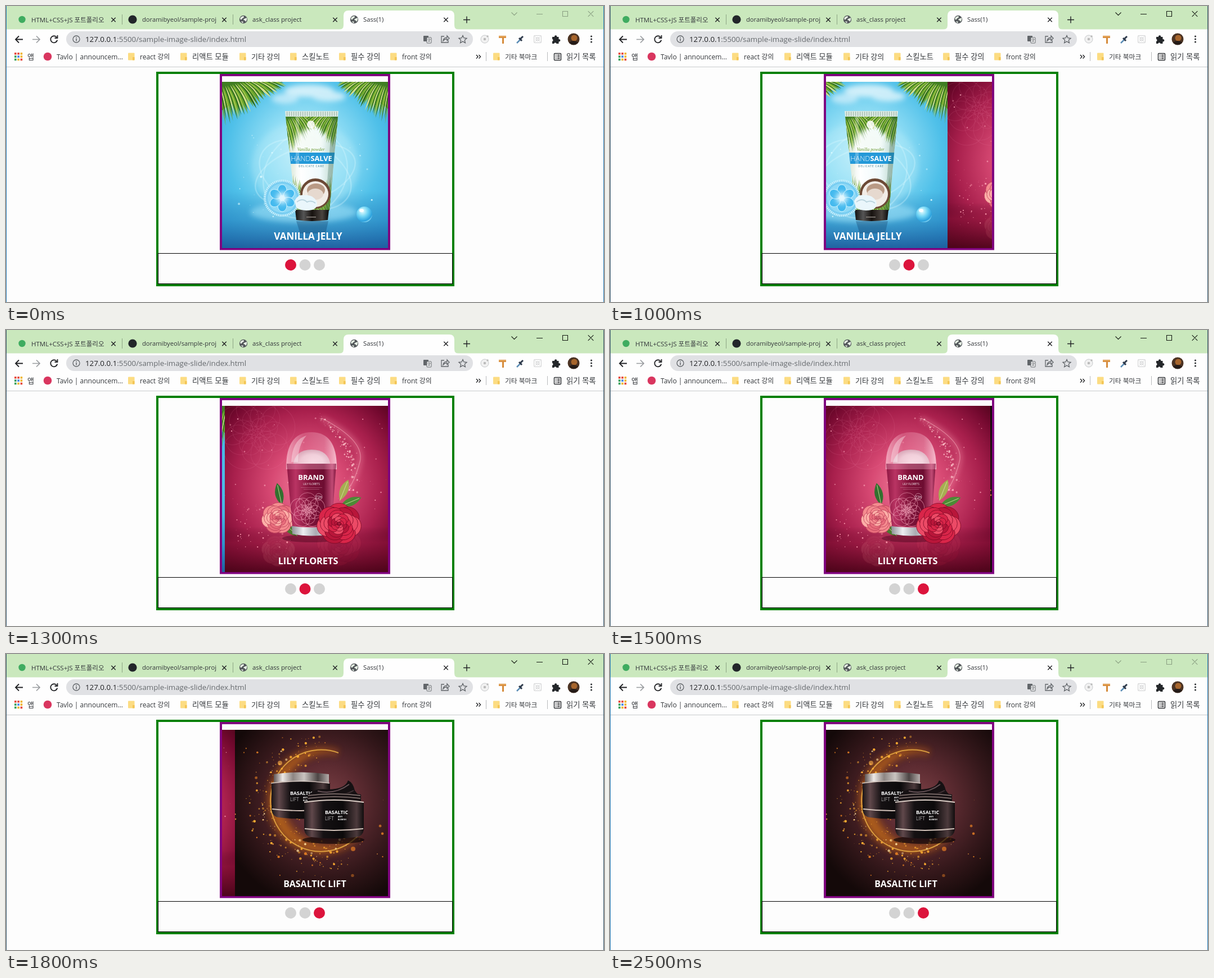
Recreate the animation shown at these times as an HTML page. Size 1063 by 527 pixels, loop 2600 ms.

```html
<!DOCTYPE html>
<html lang="ko">
<head>
<meta charset="utf-8">
<title>Image slide</title>
<style>
html, body { margin: 0; width: 100%; height: 100%; overflow: hidden; background: #fdfdfd; }
svg { display: block; }
text { font-family: "Open Sans", "Noto Sans CJK KR", "Noto Sans CJK", sans-serif; fill: #33363a; white-space: pre; }
.label { font-family: "Open Sans", "Noto Sans", sans-serif; fill: #fff; text-anchor: middle; }
.line { fill: none; stroke: #202124; stroke-width: 1.4; }
</style>
</head>
<body>
<svg id="stage" width="1063" height="527" viewBox="0 0 1063 527"></svg>
<script>
const LOOP = 2600, STEP = 100, SLIDE_W = 295;
const SLIDE_TIME = 470, SLIDE_STARTS = [912, 1490], DOT_TIMES = [1000, 1500];

// ---- drawing helpers ----
const rect = (x, y, w, h, fill, more = '') => `<rect x="${x}" y="${y}" width="${w}" height="${h}" fill="${fill}" ${more}/>`;
const circle = (x, y, r, fill, more = '') => `<circle cx="${x}" cy="${y}" r="${r}" fill="${fill}" ${more}/>`;
const oval = (x, y, rx, ry, fill, more = '') => `<ellipse cx="${x}" cy="${y}" rx="${rx}" ry="${ry}" fill="${fill}" ${more}/>`;
const path = (d, fill, more = '') => `<path d="${d}" fill="${fill}" ${more}/>`;
const line = (d, more = '') => `<path class="line" d="${d}" ${more}/>`;
const curve = (d, color, width, more = '') => path(d, 'none', `stroke="${color}" stroke-width="${width}" ${more}`);
const text = (x, y, size, s, more = '') => `<text x="${x}" y="${y}" font-size="${size}" ${more}>${s}</text>`;
const label = (x, y, size, s, weight = 700, more = '') => text(x, y, size, s, `class="label" font-weight="${weight}" ${more}`);
const group = (x, y, body, turn = '', more = '') => `<g transform="translate(${x} ${y}) ${turn}" ${more}>${body}</g>`;
const repeat = (n, fn) => Array.from({ length: n }, (_, i) => fn(i)).join('');
const random = seed => () => (seed = seed * 16807 % 2147483647) / 2147483647;
const SOFT = 'filter="url(#soft)"';

// stops: "color offset opacity" separated by commas
const gradient = (kind, id, attrs, stops) => `<${kind}Gradient id="${id}" ${attrs}>` + stops.split(',').map(s => {
  const [color, offset, alpha = 1] = s.trim().split(' ');
  return `<stop stop-color="${color}" offset="${offset}" stop-opacity="${alpha}"/>`;
}).join('') + `</${kind}Gradient>`;
const linear = (id, stops, attrs = '') => gradient('linear', id, attrs, stops);
const radial = (id, stops, attrs = '') => gradient('radial', id, attrs, stops);
const down = 'x1="0" y1="0" x2="0" y2="1"';

const defs = `<defs>
${linear('fade1', '#33363a 0,#33363a 0 1', 'gradientUnits="userSpaceOnUse" x1="160" y1="0" x2="180" y2="0"')}
${linear('fade2', '#33363a 0,#33363a 0 1', 'gradientUnits="userSpaceOnUse" x1="356" y1="0" x2="378" y2="0"')}
${radial('sky', '#d8f4fb 0,#8edcf4 .32,#4fc0e9 .62,#2a9bd6 1', 'cx=".5" cy=".42" r=".75"')}
${linear('deep', '#1c5a9c 0 0,#1f6cab .5 .35,#1b5596 1 .85', down)}
${linear('tube', '#c9dcc5 0,#fff .3,#eef9fb .65,#a5c8b6 1')}
${linear('cap', '#111 0,#555 .25,#17120f .5,#4a4440 .8,#0c0c0c 1')}
${radial('bubble', '#eaffff 0,#72d5f5 .45,#2a9fdc .85,#a8ecff 1', 'cx=".38" cy=".3" r=".75"')}
${radial('pink', '#f07f9c 0,#d84a74 .3,#a9204d .62,#74092f .85,#4c0419 1', 'cx=".5" cy=".48" r=".72"')}
${linear('wine', '#50051e 0 0,#8a1338 .35 .5,#4b0419 1 .85', down)}
${linear('glass', '#f9c3d2 0 .75,#e88aa6 .35 .35,#f4b2c6 .75 .4,#ffdbe5 1 .8')}
${linear('body', '#8d1742 0,#b93463 .18,#801239 .45,#6d0d31 .75,#c14b75 .92,#7a1239 1')}
${linear('steel', '#8f8f96 0,#eceef1 .28,#a9abb2 .6,#d9dce1 .85,#8a8b92 1')}
${radial('ball', '#fff 0,#f3edf0 .6,#cfb6c1 1')}
${radial('ember', '#7d4247 0,#5c2b31 .34,#33171a .7,#140909 1', 'cx=".54" cy=".43" r=".64"')}
${linear('jar', '#1a1517 0,#60484b .13,#151113 .32,#0c0a0b .65,#4c3a3c .88,#110d0e 1')}
${linear('lid', '#5f5553 0,#eee9e6 .16,#8d8583 .35,#c9c3c0 .55,#4c4544 .8,#b5adab 1')}
<clipPath id="window"><rect x="384" y="135" width="295" height="296"/></clipPath>
<clipPath id="frame"><rect width="${SLIDE_W}" height="296"/></clipPath>
<clipPath id="tubeShape"><path d="M113 61H206L191 229H131Z"/></clipPath>
<filter id="soft" x="-50%" y="-50%" width="200%" height="200%"><feGaussianBlur stdDeviation="5"/></filter>
</defs>`;

// ---- browser ----
const cross = (x, y, r) => `M${x - r} ${y - r}l${2 * r} ${2 * r}m0 ${-2 * r}l${-2 * r} ${2 * r}`;
const folder = x => rect(x - 6, 83.5, 11.5, 13, '#fcdc82', 'rx="1"') + path(`M${x + 2} 91h3.5v5.500h-3.5z`, '#f3c554');
const globe = x => circle(x, 24, 7.2, '#53575b') +
  path(`M${x - 5.5} 21q4-4 6.5-2.500q0 3-3 3.500q-1 3-3.500 2zM${x + 1} 23l5-2q1 4-2 7q-1-3-4-3z`, '#e8f2e6') +
  path(`M${x - 4} 27l4 1l-1 2.500q-2-1-3-3.500z`, '#e8f2e6');
const dividers = (xs, y, h, color) => xs.map(x => rect(x, y, 1, h, color)).join('');

function tabs() {
  return rect(0, 0, 1063, 42, '#cae8bd') +
    path('M592 42q8 0 8-8V17q0-9 9-9H788q9 0 9 9V34q0 8 8 8z', '#fefefe') +
    dividers([206, 403], 15, 18, '#8da584') +
    circle(28.5, 24, 6.2, '#3fac60') + circle(225, 24, 7.6, '#22262a') + globe(422) + globe(619) +
    text(45, 28.5, 11.5, 'HTML+CSS+JS 포트폴리오', 'style="fill:url(#fade1)"') +
    text(242, 28, 11.2, 'doramibyeol/sample-proj', 'style="fill:url(#fade2)"') +
    text(438, 28, 11.3, 'ask_class project') + text(635, 28, 11.3, 'Sass(1)') +
    [191, 388, 585, 782].map(x => line(cross(x, 24.5, 3.7))).join('') +
    line('M813 24.500h12m-6-6v12') +
    `<path id="controls" fill="none" stroke-width="1.1" d="M898.500 11.500l5 5 5-5M943 14.500h11M989.500 9.500h9v9h-9z${cross(1039.5, 14, 4.8)}"/>`;
}

function toolbar() {
  const grey = 'style="stroke:#606468;stroke-width:1.3"';
  return rect(0, 41.5, 1063, 67, '#fefefe') + rect(0, 108, 1063, 1, '#c8cacc') +
    rect(107, 45, 723, 28, '#e0e1e4', 'rx="14"') +
    line('M30 59.500H17m6-6l-6 6 6 6', 'style="stroke-width:1.8"') +
    line('M47 59.500h13m-6-6l6 6-6 6', 'style="stroke:#999c9f;stroke-width:1.7"') +
    line('M90 55.500a6 6 0 1 0 1.200 5M91.500 52v5h-5', 'style="stroke-width:1.8"') +
    circle(125, 59, 6, 'none', grey) + rect(124.3, 58, 1.5, 4.5, '#606468') + rect(124.3, 55.5, 1.5, 1.5, '#606468') +
    text(141, 64, 13.3, '127.0.0.1<tspan fill="#666a6e">:5500/sample-image-slide/index.html</tspan>', 'style="fill:#202124"') +
    // address bar icons
    rect(742, 53, 9, 10, '#62666a', 'rx="1"') + rect(748, 56, 8, 10, '#f2f3f4', 'rx="1" stroke="#62666a"') +
    line('M749.500 59h5m-2.500-1.500v1.500m2 0q-1 4-4 5m0-3.500l4 3.500', 'style="stroke:#62666a;stroke-width:.9"') +
    line('M779 54h-5v11h12v-4M777 62q1-6 7-6v-3l4 4.500-4 4v-3q-4 0-7 3.500z', grey) +
    line('M812 52.500l2 4.500 5 .5-3.700 3.300 1.100 4.900-4.400-2.600-4.400 2.600 1.100-4.900L805 57.500l5-.5z', grey) +
    // extensions
    circle(851, 59, 7, '#f1f1f1', 'stroke="#c6c8ca"') + circle(851, 59, 2.3, '#bbb') + circle(856, 54, 1.8, '#bbb') +
    path('M876 53h13v4h-4v10h-3V57h-6z', '#d58a3a') + rect(876, 54, 13, 1, '#f1bd76') +
    line('M908 66l6-6', 'style="stroke:#5b8db5;stroke-width:2.5"') + line('M912 57l5 5M915 58l4-4', 'style="stroke:#2f3b4c;stroke-width:3"') +
    rect(938.5, 52.5, 13, 13, '#fafafa', 'stroke="#d2d3d4" rx="1"') + circle(945, 59, 3, 'none', 'stroke="#d2d3d4"') + line('M939 53l12 12m0-12l-12 12', 'style="stroke:#dddedf;stroke-width:1"') +
    path('M971 55h4a2.200 2.200 0 1 1 4.200 0h3.300v4.200a2.200 2.200 0 1 1 0 4.200V67h-4a2.200 2.200 0 0 0-4.300 0H971v-4a2.200 2.200 0 0 0 0-4.200z', '#24272a') +
    circle(1009, 59, 10.5, '#4b3323') + circle(1010, 57, 5.5, '#a7652c') + path('M1001 65q8-6 16 0q-8 8-16 0z', '#241b18') +
    repeat(3, i => circle(1040.5, 54 + 5 * i, 1.6, '#303336'));
}

function bookmarks() {
  const dots = ['#e6483b', '#e6483b', '#f0b429', '#38a05b', '#4384ec', '#f0b429', '#38a05b', '#f0b429', '#e6483b'];
  const items = [[223, 'react 강의', 12], [316, '리액트 모듈', 13.3], [421, '기타 강의', 13], [511, '스킬노트', 13.3], [598, '필수 강의', 13.3], [689, 'front 강의', 12], [872, '기타 북마크', 11.8]];
  return dots.map((c, i) => rect(15 + i % 3 * 5.3, 83 + Math.floor(i / 3) * 5.3, 3.6, 3.6, c)).join('') +
    text(38, 94.5, 13, '앱') + circle(74, 90, 7.3, '#d9365f') + text(90, 94.5, 12, 'Tavlo | announcem…') +
    items.map(([x, s, size]) => folder(x) + text(x + 15, 94.5, size, s)).join('') +
    line('M836 87l3 3.300-3 3.300m4.500-6.600l3 3.300-3 3.300') + dividers([853, 962], 82, 16, '#b9bbbd') +
    rect(974.5, 84.5, 12, 12, 'none', 'rx="1" stroke="#303336" stroke-width="1.5"') +
    line('M977 87.500h1.500m1.500 0h4.500M977 90.500h1.500m1.500 0h4.500M977 93.500h1.500m1.500 0h4.500') +
    text(996, 94.5, 13.3, '읽기 목록');
}

// ---- slide pictures ----
function sparks(n, seed, color, place, size = 1.2) {
  const rnd = random(seed);
  return repeat(n, () => {
    const [x, y] = place(rnd);
    return circle(x.toFixed(1), y.toFixed(1), (size * (.3 + rnd() ** 2)).toFixed(2), color, `opacity="${(.4 + rnd() * .6).toFixed(2)}"`);
  });
}

// needles fan out of a corner, their tips on a diagonal arc
function palm(n, seed) {
  const rnd = random(seed), greens = ['#2c6b1d', '#6aa52c', '#a3c748', '#417f22', '#d3df8a'];
  return path('M-5-5H88Q44 20-5 54z', '#3f7d22') + repeat(n, i => {
    const u = i / (n - 1), v = 1 - u, reach = .82 + rnd() * .24;
    const x = 72 - 80 * u, y = -8 + 18 * u;
    const dx = (118 * v * v + 132 * u * v + 4 * u * u - x) * reach;
    const dy = (4 * v * v + 88 * u * v + 80 * u * u - y) * reach;
    const at = (a, b) => `${(x + dx * a).toFixed(1)} ${(y + dy * b).toFixed(1)}`;
    return path(`M${at(0, 0)}Q${at(.68, .36)} ${at(1, 1)}Q${at(.5, .52)} ${at(0, 0)}`, greens[i % 5]);
  });
}

function blueSlide() {
  const leaf = palm(48, 17);
  const swirl = (rx, ry, turn) => oval(148, 165, rx, ry, 'none', `stroke="#e3fbff" stroke-opacity=".28" stroke-width="2.5" transform="rotate(${turn} 148 165)"`);
  const tube = rect(110, 58, 100, 175, 'url(#tube)') +
    group(108, 60, leaf, 'scale(.66 .95)') + group(212, 60, leaf, 'scale(-.58 .85)') +
    group(124, 234, leaf, 'scale(.5 -.9)') + group(198, 234, leaf, 'scale(-.42 -.9)') +
    oval(156, 106, 26, 22, '#f4fbf6', `opacity=".8" ${SOFT}`) + rect(110, 126, 100, 20, '#2499d8') +
    rect(131, 60, 6, 170, '#fff', 'opacity=".25"') + path('M196 60h10l-15 170h-8z', '#1d4c38', 'opacity=".25"');
  const petals = repeat(6, i => oval(107, 193, 8, 10, '#43b9ee', `stroke="#c6f1ff" transform="rotate(${i * 60} 107 207)"`));
  const haze = oval(155, 16, 44, 11, '#e9f8fd') + oval(190, 26, 30, 9, '#e3f6fc') + oval(112, 30, 24, 9, '#cdeefa') +
    oval(148, 150, 95, 80, '#b4ebfa', 'opacity=".5"') + oval(145, 232, 95, 18, '#a4e6fb', 'opacity=".7"');
  return rect(0, 0, SLIDE_W, 296, 'url(#sky)') + rect(0, 195, SLIDE_W, 101, 'url(#deep)') +
    group(0, 0, haze, '', `${SOFT} opacity=".8"`) +
    swirl(92, 48, -18) + swirl(86, 56, 25) + swirl(70, 82, 38) +
    sparks(48, 29, '#d9faff', r => [30 + r() * 240, 95 + r() * 150], 1.7) +
    group(0, 0, leaf) + group(295, 0, leaf, 'scale(-.8 .95)') +
    path('M132 248h57l-5 22h-45z', '#123f6b', 'opacity=".35"') +
    `<g clip-path="url(#tubeShape)">${tube}</g>` +
    path('M112 52h95l-1 10h-93z', '#dbe9e2') + repeat(23, i => rect(115 + i * 4, 53, 1.2, 8, '#9fb8ab')) +
    circle(158, 76, 7, '#fff', 'opacity=".85"') +
    text(158, 123, 8, 'Vanilla powder', 'text-anchor="middle" font-style="italic" style="fill:#6d9a34;font-family:\'Liberation Serif\',serif"') +
    label(159, 141, 12.8, '<tspan font-weight="300">HAND</tspan>SALVE') + label(159, 151.5, 4.5, 'DELICATE CARE', 600, 'style="fill:#5b8e9c" letter-spacing="1"') +
    path('M130 228h60l-2 18q-29 4-56 0z', 'url(#cap)') + rect(150, 240, 17, 1.5, '#8b8580') +
    circle(107, 207, 31, '#78cdf1', 'stroke="#c9f0fc" stroke-width="4" stroke-dasharray="2 1.2"') + circle(107, 207, 26, '#8fd9f6') + petals + circle(107, 207, 10, '#eafaff', SOFT) +
    circle(166, 199, 27, '#6c4935') + circle(166, 200, 23, '#f2ece6') + oval(167, 193, 16, 12, '#b99a85') + oval(166, 200, 14, 10, '#e6d9cf') +
    path('M129 212q6-13 18-10q13-2 21 10q4 12-8 16q-18 3-28-4z', '#eaf6fb') + curve('M133 214q10-8 18 0q8-4 15 2', '#bcd5df', 2) +
    circle(253, 236, 14, 'url(#bubble)') + oval(248, 229, 4, 3, '#fff', 'opacity=".9"') +
    label(153, 281, 17, 'VANILLA JELLY');
}

function flower(x, y, r, colors) {
  return group(x, y, repeat(6, k => {
    const size = r * (1 - k * .16), n = 7 - k % 3;
    return repeat(n, i => oval(0, (-size * .55).toFixed(1), (size * .48).toFixed(1), (size * .42).toFixed(1), colors[(k + i) % 3], `stroke="${colors[3]}" stroke-width=".8" transform="rotate(${i * 360 / n + k * 29})"`));
  }) + curve('M-4 0q4-7 8 0q-4 6-8 0', colors[3], 1.5), 'scale(1 .92)');
}

function sketch(x, y, r, color, alpha) {
  return group(x, y, repeat(4, k => repeat(5, i => oval(0, -r * (.55 - k * .12), r * (.46 - k * .1), r * (.4 - k * .08), 'none', `stroke="${color}" stroke-opacity="${alpha}" transform="rotate(${i * 72 + k * 31})"`))));
}

function redSlide() {
  const blade = (x, y, turn, color) => group(x, y, path('M0 20Q-15 0 0-20Q14 0 0 20', color) + curve('M0 20V-16', '#d5e3a0', .8), `rotate(${turn})`);
  const reds = ['#d92549', '#b9163a', '#ec4a66', '#7d0a26'], pinks = ['#f58b8f', '#e96d7c', '#ffb0a8', '#b83d57'];
  const blooms = flower(95, 200, 31, pinks) + flower(203, 210, 41, reds);
  const trail = 'M172 22Q250 62 240 100T216 152';
  const arc = r => {
    const u = r(), w = (r() + r() - 1) * 16;
    return [172 + 148 * u * (1 - u) + 50 * u * u + w, 22 + 130 * u + w * .4];
  };
  return rect(0, 0, SLIDE_W, 296, 'url(#pink)') + sketch(55, 48, 75, '#f28aa8', .14) + rect(0, 215, SLIDE_W, 81, 'url(#wine)') +
    curve(trail, '#ff9db4', 8, `opacity=".35" ${SOFT}`) + curve(trail, '#ffc0c9', 1.2, 'opacity=".5"') +
    sparks(110, 41, '#ffc4ca', arc, 1.5) + sparks(70, 73, '#ff9db0', r => [20 + r() * 100, 170 + r() * 85], 1.3) +
    sparks(55, 97, '#ffa9bb', r => [r() * 295, r() * 210]) +
    group(0, 458, blooms, 'scale(1 -1)', 'opacity=".12"') +
    blade(97, 157, -12, '#33702f') + blade(115, 218, -45, '#4a7a2e') + blade(212, 150, 22, '#a7ae52') + blade(224, 171, 67, '#4c8b36') +
    oval(154, 236, 52, 7, '#4d061e', 'opacity=".45"') +
    flower(95, 200, 31, pinks) +
    path('M121 122V107Q124 78 154 78Q185 78 188 107V122Z', 'url(#ball)') +
    path('M109 113Q108 47 154 47Q200 47 199 113Z', 'url(#glass)') + path('M118 100Q120 60 145 53Q130 70 130 100z', '#fff', 'opacity=".35"') +
    path('M110 103H198L190 215H120Z', 'url(#body)') + path('M110 103h88l-1 10h-86z', '#e69ab4', 'opacity=".4"') +
    sketch(147, 186, 33, '#f7aabf', .55) +
    path('M119 214Q154 219 191 214L190 228Q154 235 120 228Z', 'url(#steel)') +
    label(153.5, 132, 13, 'BRAND') + label(154, 141, 4.8, 'LILY FLORETS', 400) +
    rect(135, 145, 38, .6, '#e5a4b9', 'opacity=".6"') + rect(140, 148, 28, .6, '#e5a4b9', 'opacity=".6"') +
    circle(167, 162, 6, 'none', 'stroke="#f2c2d0" stroke-width=".6"') + label(167, 165, 6.5, '72h', 400) +
    flower(203, 210, 41, reds) + label(148, 282, 16.3, 'LILY FLORETS');
}

function jar(x, y, w, h, left) {
  const print = (dx, dy, size, s, weight) => label(left + dx, dy, size, s, weight, 'style="text-anchor:start"');
  return group(x, y, path(`M0 4Q${w / 2}-3 ${w} 4V${h - 13}Q${w - 2} ${h - 1} ${w - 13} ${h}Q${w / 2} ${h + 5} 13 ${h}Q2 ${h - 1} 0 ${h - 13}Z`, 'url(#jar)') +
    curve(`M1 ${h - 15}Q${w / 2} ${h - 9} ${w - 1} ${h - 15}`, '#d5c5bc', 1.8) +
    print(0, 25, 8.8, 'BASALTIC', 700) + print(0, 35.5, 8.8, 'LIFT', 300) +
    print(23, 31, 3.4, 'ANTI', 700) + print(23, 35.5, 3.4, 'BLEMISH', 700));
}

function darkSlide() {
  const ring = (spread, from, to) => r => {
    const a = from + (to - from) * r(), d = 90 + (r() + r() - .9) * spread;
    return [152 + Math.cos(a) * d, 126 + Math.sin(a) * d];
  };
  const crescent = 'M184 41A91 91 0 1 0 218 190A84 84 0 1 1 184 41Z';
  return rect(0, 0, SLIDE_W, 296, 'url(#ember)') +
    path(crescent, '#e8841a', `${SOFT} opacity=".65" stroke="#b0560f" stroke-width="16" stroke-opacity=".5"`) +
    curve('M184 41A90 90 0 0 0 64 114A90 90 0 0 0 218 189', '#ffc34c', 2, 'opacity=".7"') +
    sparks(190, 61, '#ffae32', ring(46, 1, 4.7), 1.8) + sparks(60, 87, '#ff8e25', ring(90, .4, 4.9), 2.1) + sparks(35, 53, '#ffe0a0', ring(24, .8, 4.2), 1.9) +
    sparks(22, 111, '#e79540', r => [r() * 285, 15 + r() * 225]) +
    circle(80, 59, 4, '#ffb04a', 'opacity=".6"') + circle(210, 212, 4, '#ff8c25', 'opacity=".6"') +
    oval(175, 196, 55, 7, '#080405', 'opacity=".65"') +
    jar(65, 91, 104, 65, 33) + path('M69 79Q118 72 167 79V94Q118 88 69 94Z', 'url(#lid)') + curve('M64 95Q118 88 168 95', '#d8ccc5', 1.5) +
    path('M132 116Q139 103 165 106Q196 106 201 90Q210 94 213 108L222 119Q178 126 132 116Z', '#161113') +
    curve('M147 109Q178 116 203 97', '#655256', 2) + curve('M157 115Q194 118 211 108', '#433437', 1.5) +
    path('M129 115Q177 108 224 115V128H129Z', '#191315') + curve('M130 117Q177 111 223 117M130 122Q177 116 223 122', '#8b7b77', 1.3) +
    jar(123, 125, 106, 66, 37) + curve('M123 129Q177 121 229 129', '#ddd0c8', 1.8) +
    label(142, 280, 16, 'BASALTIC LIFT');
}

// ---- scene ----
const slides = [blueSlide, redSlide, darkSlide];
document.getElementById('stage').innerHTML = defs + rect(0, 0, 1063, 527, '#fdfdfd') + tabs() + toolbar() + bookmarks() +
  rect(269, 119, 526, 378, '#fdfdfd', 'stroke="#008000" stroke-width="4"') +
  rect(270.5, 440.5, 523, 54, '#fdfdfd', 'stroke="#000"') +
  rect(382, 123, 299, 309.5, '#fdfdfd', 'stroke="#800080" stroke-width="4"') +
  `<g clip-path="url(#window)"><g id="track">${slides.map((draw, i) => group(384 + i * SLIDE_W, 135, draw(), '', 'clip-path="url(#frame)"')).join('')}</g></g>` +
  repeat(3, i => circle(506 + 25.5 * i, 461, 10, '#d3d3d3', 'class="dot"')) +
  `<path id="edge" d="M.5 0V527M1062.500 0V527"/>`;

const track = document.getElementById('track'), edge = document.getElementById('edge');
const controls = document.getElementById('controls'), dots = document.querySelectorAll('.dot');

// cubic-bezier(.25, .1, .25, 1)
function ease(x) {
  if (x <= 0) return 0;
  if (x >= 1) return 1;
  let lo = 0, hi = 1, s;
  for (let i = 0; i < 24; i++) {
    s = (lo + hi) / 2;
    if (.75 * s * (1 - s) + s ** 3 < x) lo = s; else hi = s;
  }
  return .3 * s * (1 - s) ** 2 + 3 * s * s * (1 - s) + s ** 3;
}

function render(time) {
  const t = Math.floor(time % LOOP / STEP) * STEP;
  const place = SLIDE_STARTS.reduce((sum, start) => sum + ease((t - start) / SLIDE_TIME), 0);
  const active = DOT_TIMES.filter(start => t >= start).length;
  const focused = t >= 900 && t < 2500;
  track.setAttribute('transform', `translate(${-Math.round(place * SLIDE_W)} 0)`);
  dots.forEach((dot, i) => dot.setAttribute('fill', i === active ? '#dc143c' : '#d3d3d3'));
  controls.setAttribute('stroke', focused ? '#161b14' : '#8ba083');
  edge.setAttribute('stroke', focused ? '#35566b' : '#2179b5');
}

const begin = performance.now();
function tick() {
  render(performance.now() - begin);
  requestAnimationFrame(tick);
}
tick();
</script>
</body>
</html>
```
